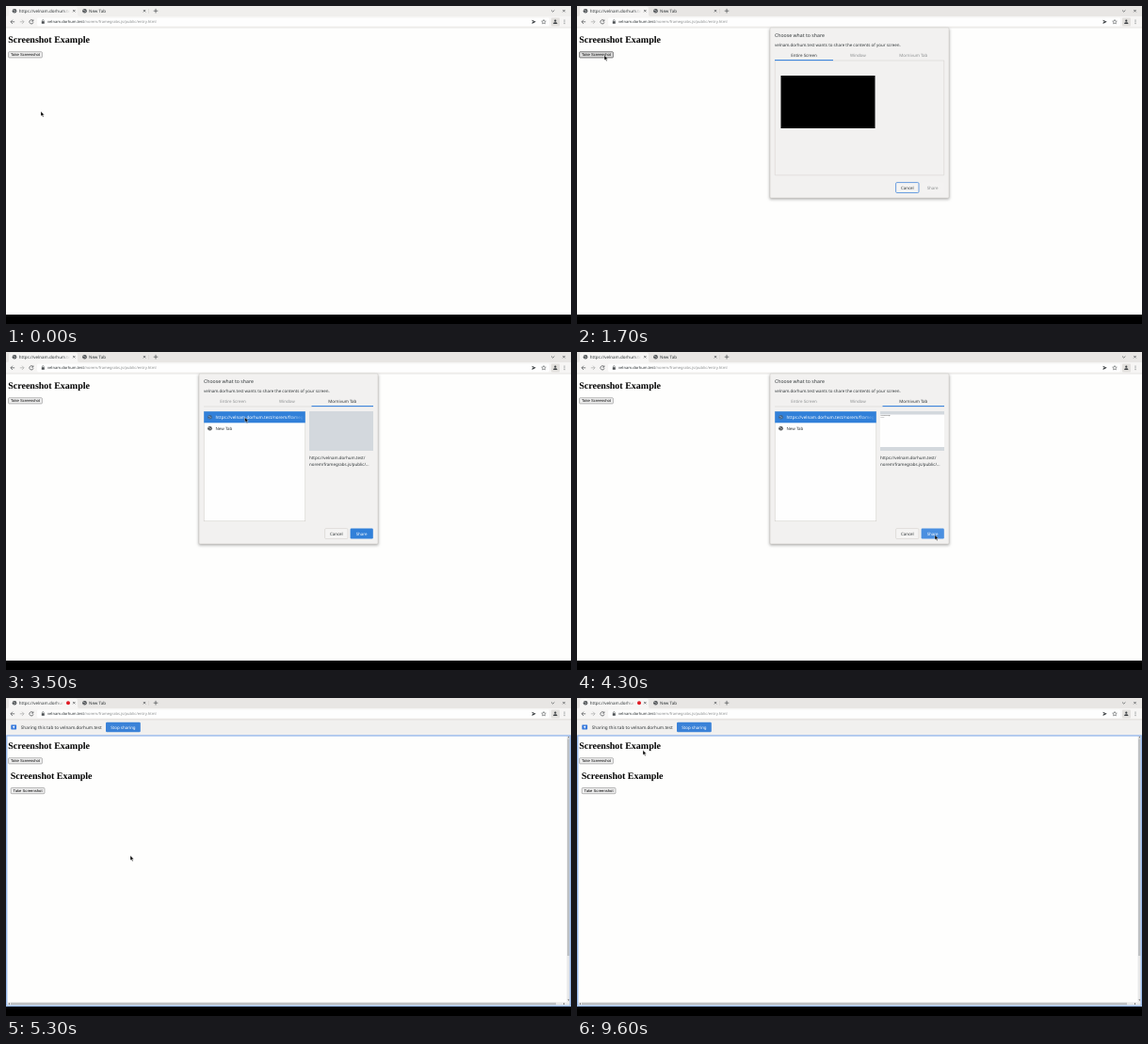
These frames come from a looping animation (600 px wide and 338 px high, 9.7 s). An HTML page:

```html
<!DOCTYPE html>
<html lang="en">
<head>
<meta charset="utf-8">
<title>Screenshot Example</title>
<style>
  html, body { margin: 0; width: 100%; height: 100%; overflow: hidden; background: #fefefd; }
  svg { display: block; width: 100vw; height: 100vh; }
  text { font-family: "Noto Sans", "Open Sans", sans-serif; font-size: 4.45px; fill: #2e3436; text-rendering: geometricPrecision; }
  .tab { font-size: 4.5px; }
  .url { font-size: 4.08px; }
  .mid { text-anchor: middle; }
  .pale { fill: #8d9091; }
  .white { fill: #fff; }
  .head { font: bold 10px "Liberation Serif", "Times New Roman", serif; fill: #000; }
  .push { font: 4.17px "Liberation Sans", Arial, sans-serif; fill: #000; }
  .line { fill: none; stroke: #3c4043; stroke-width: .65; }
  .thin { fill: none; stroke: #d3cfca; stroke-width: .5; }
</style>
</head>
<body>
<svg viewBox="0 0 600 338" preserveAspectRatio="none">
  <defs>
    <linearGradient id="fadeLong" gradientUnits="userSpaceOnUse" x1="60" x2="68">
      <stop stop-color="#2e3436"/><stop offset="1" stop-color="#2e3436" stop-opacity="0"/>
    </linearGradient>
    <linearGradient id="fadeShort" gradientUnits="userSpaceOnUse" x1="53" x2="62">
      <stop stop-color="#2e3436"/><stop offset="1" stop-color="#2e3436" stop-opacity="0"/>
    </linearGradient>
    <linearGradient id="fadeRow" gradientUnits="userSpaceOnUse" x1="302" x2="317">
      <stop stop-color="#fff"/><stop offset="1" stop-color="#fff" stop-opacity="0"/>
    </linearGradient>
    <filter id="blur" x="-10%" y="-10%" width="120%" height="120%"><feGaussianBlur stdDeviation="1.8"/></filter>
    <g id="globe">
      <circle r="2.3" fill="#4a4e51"/>
      <path d="M-1.5-.7Q-.2-1.6.2-.4T1.5.5M-1 1.1L.1.7" fill="none" stroke="#e8e8e8" stroke-width=".55"/>
    </g>
    <path id="cross" class="line" d="M-1.2-1.2L1.2 1.2M1.2-1.2L-1.2 1.2"/>
    <g id="page">
      <text class="head" x="2.2" y="39.2">Screenshot Example</text>
      <rect x="2.6" y="48.7" width="35.8" height="6.2" rx=".9" fill="#efefef" stroke="#767676" stroke-width=".5"/>
      <text class="push mid" x="20.5" y="53.3">Take Screenshot</text>
    </g>
  </defs>

  <rect width="600" height="338" fill="#fefefd"/>

  <!-- tab strip -->
  <rect id="strip" width="600" height="11"/>
  <path d="M1 11Q3 11 3 9V2.5Q3 .8 5 .8H74Q76 .8 76 2.5V9Q76 11 78 11z" fill="#f6f5f4"/>
  <use href="#globe" x="9" y="5.3"/>
  <text id="tabTitle" class="tab" x="13.8" y="7">https://velnam.dorhum.test</text>
  <circle id="record" cx="66" cy="5.3" r="2" fill="#e01b24"/>
  <use href="#cross" x="72.3" y="5.2"/>
  <use href="#globe" x="83.5" y="5.3"/>
  <text class="tab" x="88" y="7">New Tab</text>
  <use href="#cross" x="147" y="5.2"/>
  <path class="line" d="M156.7 5.2h4.6M159 2.9v4.6M579 4.5l1.7 1.6 1.7-1.6"/>
  <path d="M151.5 3v5" class="thin"/>
  <use href="#cross" x="592.5" y="5.2"/>

  <!-- toolbar -->
  <rect y="11" width="600" height="12" fill="#f6f5f4"/>
  <rect x="33" y="12.4" width="544" height="8.8" rx="1.6" fill="#fefefe"/>
  <path class="line" d="M9.2 16.8H5M7 14.7L4.9 16.8 7 18.9"/>
  <path class="line" d="M14.8 16.8H19M17 14.7l2.1 2.1L17 18.9" style="stroke:#a2a4a5"/>
  <path class="line" d="M28.5 15.4A2.1 2.1 0 1 0 29 17.3M28.9 14.4v1.7h-1.7"/>
  <rect x="37.8" y="16.2" width="3" height="2.6" rx=".3" fill="#4a4e51"/>
  <path class="line" d="M38.4 16.3v-.8a.9.9 0 0 1 1.8 0v.8" style="stroke-width:.5"/>
  <text class="url" x="44" y="18.4">velnam.dorhum.test<tspan class="pale">/norem/framegrabs.js/public/entry.html</tspan></text>
  <path d="M558.5 14.7l4.3 2.1-4.3 2.1.3-1.6 2-.5-2-.5z" fill="#3c4043"/>
  <path class="line" d="M571 14.5l.7 1.5 1.6.2-1.2 1.1.3 1.6-1.4-.8-1.4.8.3-1.6-1.2-1.1 1.6-.2z" style="stroke-width:.5"/>
  <rect x="579" y="12.4" width="9" height="9" rx="1" fill="#e3e1de"/>
  <circle cx="583.3" cy="15.7" r="1.1" fill="#3c4043"/>
  <path d="M581.2 19v-.5q0-1.2 2.1-1.2t2.1 1.2v.5z" fill="#3c4043"/>
  <path d="M593 14.7v4.4" stroke="#3c4043" stroke-width=".8" stroke-dasharray=".8 1"/>
  <path class="thin" d="M0 23h600"/>

  <g id="before">
    <use href="#page"/>
    <rect id="hover" x="2.6" y="48.7" width="35.8" height="6.2" rx=".9" fill="#000" fill-opacity=".08" stroke="#444" stroke-width=".4"/>
  </g>

  <!-- sharing bar and captured page -->
  <g id="after">
    <rect y="23" width="600" height="16.5" fill="#f1f0ef"/>
    <path class="thin" d="M0 23h600"/>
    <rect x="5.3" y="28.4" width="5.8" height="5" rx=".6" fill="#3578dc"/>
    <path d="M8.2 29.4l1.5 1.5H8.7v1.3h-1v-1.3h-1z" fill="#fff"/>
    <text x="15.8" y="32.6" style="font-size:4.67px">Sharing this tab to velnam.dorhum.test</text>
    <rect x="106" y="25.7" width="36.8" height="10.5" rx="1.2" fill="#3a82d8"/>
    <text class="mid white" x="124.4" y="32.5">Stop sharing</text>
    <use href="#page" y="15"/>
    <g id="capture">
      <use href="#page" x="2.6" y="46.8"/>
      <rect x="595.6" y="40" width="3.2" height="283" fill="#e9e9e9"/>
      <rect x="596" y="43.5" width="2.5" height="230.5" fill="#bfc1c3"/>
      <rect x="1.5" y="323.4" width="597.3" height="3.2" fill="#e9e9e9"/>
      <rect x="5" y="323.8" width="579" height="2.4" fill="#bfc1c3"/>
      <path d="M596.4 320.5h2l-1 1.3zM592 324v2l1.3-1zM3.8 324v2l-1.3-1zM596.4 42.3h2l-1-1.3z" fill="#4d4d4d"/>
    </g>
    <rect x=".75" y="40" width="598.5" height="287.2" fill="none" stroke="#8fb3ea" stroke-width="1.3"/>
  </g>

  <rect y="328" width="600" height="10"/>

  <!-- share dialog -->
  <g id="dialog">
    <rect x="204.5" y="24.5" width="191" height="181" rx="1" fill-opacity=".32" filter="url(#blur)"/>
    <rect x="205" y="23" width="190" height="181" rx="1" fill="#f2f1f0" stroke="#c9c5c0" stroke-width=".5"/>
    <text x="210" y="33" style="font-size:5.2px">Choose what to share</text>
    <text x="210" y="43.2">velnam.dorhum.test wants to share the contents of your screen.</text>
    <text id="screenTab" class="mid" x="241" y="54.4">Entire Screen</text>
    <text class="mid pale" x="298.3" y="54.4">Window</text>
    <text id="pageTab" class="mid" x="357.3" y="54.4">Mornivum Tab</text>
    <path class="thin" d="M210 58h180"/>
    <rect id="underline" y="57" width="62" height="1.1" fill="#3f86dc"/>

    <g id="screenPane">
      <path class="thin" d="M210.3 58v121.8h179.4V58"/>
      <rect x="216.5" y="74" width="100" height="56"/>
    </g>

    <g id="pagePane">
      <rect x="210.2" y="63.2" width="107.6" height="116.6" fill="#fefefe" stroke="#cdc9c4" stroke-width=".5"/>
      <g id="plainRow">
        <use href="#globe" x="216.5" y="69.3"/>
        <text x="222.5" y="71">https://velnam.dorhum.test/norem/</text>
      </g>
      <use href="#globe" x="216.5" y="81.3"/>
      <text x="222.5" y="83">New Tab</text>
      <g id="chosen">
        <rect x="210.2" y="63.2" width="107.6" height="12.1" fill="#3180d9"/>
        <use href="#globe" x="216.5" y="69.3" opacity=".6"/>
        <text x="222.5" y="71" style="fill:url(#fadeRow);font-size:4.6px">https://velnam.dorhum.test/norem/framegr</text>
        <rect x="322" y="63" width="68" height="42" fill="#d3d8dd"/>
        <g id="preview">
          <rect x="322" y="66.5" width="68" height="34.5" fill="#fefefe"/>
          <text class="head" x="322.4" y="68.4" style="font-size:1.2px">Screenshot Example</text>
          <rect x="322.3" y="69.3" width="4" height=".7" fill="#c4c4c4"/>
        </g>
        <text x="322" y="113.6">https://velnam.dorhum.test/</text>
        <text x="322" y="121.2">norem/framegrabs.js/public/…</text>
      </g>
    </g>

    <rect id="cancel" x="338.6" y="187.6" width="24.4" height="10.9" rx="1.2" fill="#f5f4f3"/>
    <text class="mid" x="350.8" y="194.6">Cancel</text>
    <rect id="share" x="365.6" y="187.6" width="24.2" height="10.9" rx="1.2"/>
    <text id="shareText" class="mid" x="377.6" y="194.6">Share</text>
  </g>

  <path id="cursor" d="M0 0V5.1L1.2 4.1 2.1 6.1 3 5.7 2.1 3.8H3.7z" stroke="#fff" stroke-width=".35"/>
</svg>

<script>
const LOOP = 9700, STEP = 100;
const el = id => document.getElementById(id);
const show = (id, on) => el(id).style.display = on ? "" : "none";
const set = (id, attrs) => { for (const k in attrs) el(id).setAttribute(k, attrs[k]); };

// time, x, y of the pointer tip
const path = [
  [0, 37, 112], [500, 37, 112], [1200, 29, 52.5], [1800, 29, 52.5],
  [2500, 355, 52.5], [2700, 355, 52.5], [3200, 253.7, 69.5], [3600, 253.7, 69.5],
  [4200, 380, 194.5], [4400, 380, 194.5], [5200, 132, 167.5], [8700, 132, 167.5],
  [9500, 70, 55.5], [LOOP, 70, 55.5]
];

function pointer(t) {
  const i = path.findIndex(p => p[0] > t);
  const [t0, x0, y0] = path[i - 1], [t1, x1, y1] = path[i];
  const u = (t - t0) / (t1 - t0), e = u * u * (3 - 2 * u);
  return [x0 + (x1 - x0) * e, y0 + (y1 - y0) * e];
}

// the recording dot throbs five times, then stays lit
function throb(t) {
  const phase = (t - 4600) / 700;
  if (phase < 0) return 0;
  if (phase >= 5) return 1;
  return Math.floor(phase) % 2 ? 1 - phase % 1 : phase % 1;
}

function draw(t) {
  const shared = t >= 4500, pages = t >= 2600, chosen = t >= 3300;
  set("strip", { fill: t < 200 ? "#f0efed" : "#e8e6e4" });
  show("before", !shared);
  show("hover", t >= 1200 && t < 1900);
  show("after", shared);
  show("capture", t >= 4800);
  el("tabTitle").style.fill = `url(#${t >= 4600 ? "fadeShort" : "fadeLong"})`;
  set("record", { opacity: throb(t) });

  show("dialog", t >= 1500 && t < 4400);
  show("screenPane", !pages);
  show("pagePane", pages);
  show("plainRow", !chosen);
  show("chosen", chosen);
  show("preview", t >= 3800);
  set("screenTab", { class: pages ? "mid pale" : "mid" });
  set("pageTab", { class: pages ? "mid" : "mid pale" });
  set("underline", { x: pages ? 324.5 : 210, width: pages ? 65.5 : 62 });
  set("cancel", { stroke: pages ? "#cdc9c4" : "#5a93dd", "stroke-width": pages ? .5 : .9 });
  set("share", { fill: !chosen ? "#f3f2f1" : t >= 4200 ? "#4a8fe0" : "#3180d9" });
  set("shareText", { class: chosen ? "mid white" : "mid pale" });

  show("cursor", t < 6400 || t >= 8700);
  set("cursor", { transform: `translate(${pointer(t)})` });
}

const start = performance.now();
function tick() {
  const t = (performance.now() - start) % LOOP;
  draw(Math.floor(t / STEP) * STEP);
  requestAnimationFrame(tick);
}
tick();
</script>
</body>
</html>
```
